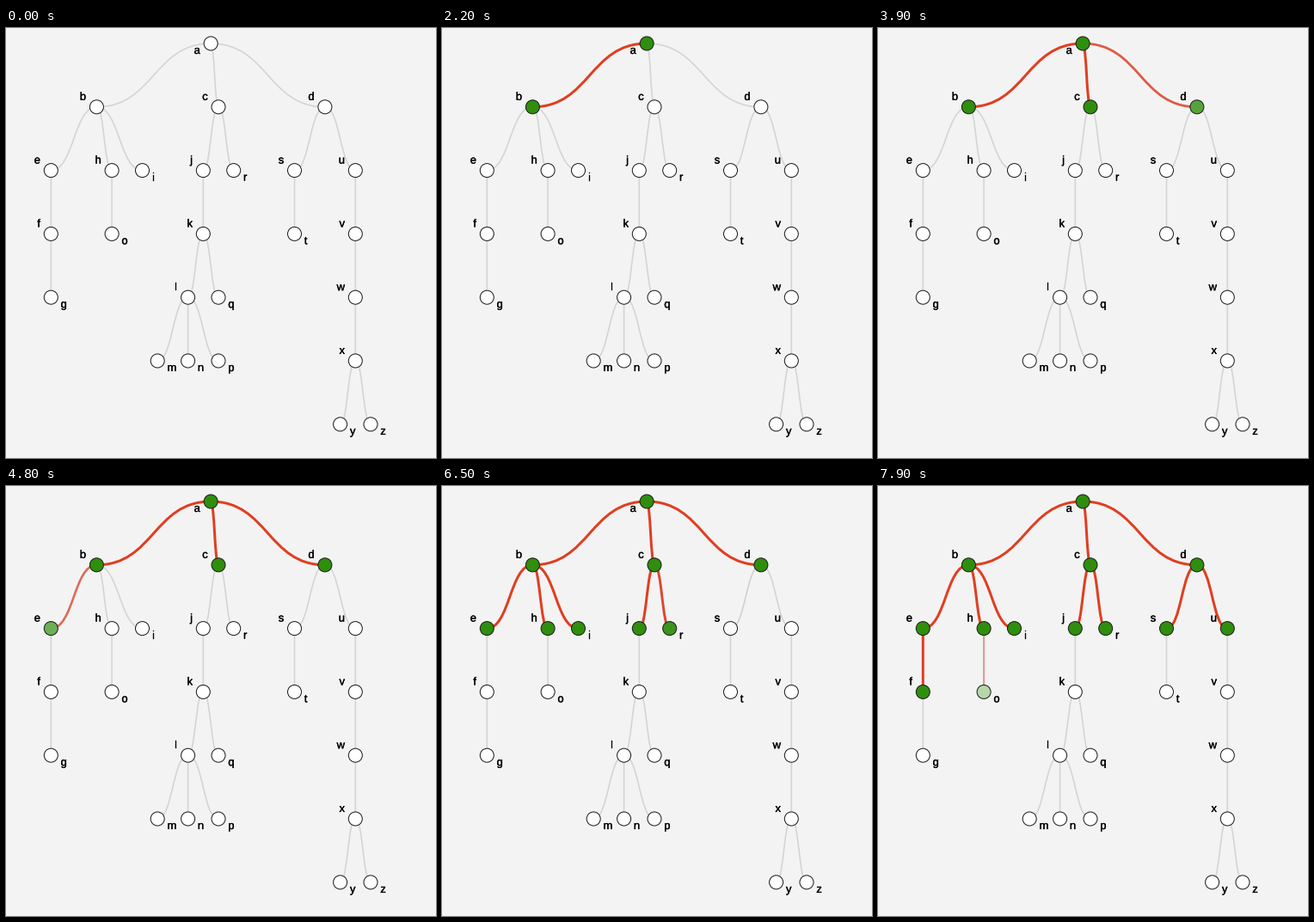
A matplotlib script for the animation above (8 s loop, 500x500 px).

```python
import matplotlib.pyplot as plt
import numpy as np
from matplotlib.animation import FuncAnimation
from matplotlib.colors import to_rgb
from matplotlib.patches import Circle, PathPatch
from matplotlib.path import Path
from matplotlib.patheffects import withStroke

SIZE, DPI = 500, 100
FRAME_MS, FRAMES = 100, 80
FADE_MS = 750
PX = 72 / DPI

BACKGROUND = "#f3f3f3"
NODE_IDLE, NODE_SEEN = "#ffffff", "#2f8e0e"
EDGE_IDLE, EDGE_SEEN = "#d4d4d4", "#e03e20"
EDGE_WIDTH = 1.6, 3.0
RADIUS = 8

# name: (parent, column, depth)
TREE = {
    "a": (None, 10.5, 0),
    "b": ("a", 3, 1), "c": ("a", 11, 1), "d": ("a", 18, 1),
    "e": ("b", 0, 2), "h": ("b", 4, 2), "i": ("b", 6, 2),
    "j": ("c", 10, 2), "r": ("c", 12, 2),
    "s": ("d", 16, 2), "u": ("d", 20, 2),
    "f": ("e", 0, 3), "o": ("h", 4, 3), "k": ("j", 10, 3),
    "t": ("s", 16, 3), "v": ("u", 20, 3),
    "g": ("f", 0, 4), "l": ("k", 9, 4), "q": ("k", 11, 4), "w": ("v", 20, 4),
    "m": ("l", 7, 5), "n": ("l", 9, 5), "p": ("l", 11, 5), "x": ("w", 20, 5),
    "y": ("x", 19, 6), "z": ("x", 21, 6),
}

# Moment at which the breadth-first search reaches each node, in ms
VISITS = {
    "a": 400, "b": 1430, "c": 2665, "d": 3420, "e": 4365, "h": 4870,
    "i": 5365, "j": 5450, "r": 5930, "s": 6350, "u": 6765, "f": 7160, "o": 7565,
}


def position(name):
    _, column, depth = TREE[name]
    return 52.3 + 17.7 * column, 18 + 73.8 * depth


def ease(t):
    t = min(max(t, 0), 1)
    return 4 * t**3 if t < 0.5 else 1 - 4 * (1 - t) ** 3


def mix(start, end, amount):
    start, end = np.array(to_rgb(start)), np.array(to_rgb(end))
    return tuple(start + (end - start) * amount)


def add_edge(parent, child):
    (x0, y0), (x1, y1) = position(parent), position(child)
    middle = (x0 + x1) / 2
    path = Path([(x0, y0), (middle, y0), (middle, y1), (x1, y1)],
                [Path.MOVETO] + [Path.CURVE4] * 3)
    return ax.add_patch(PathPatch(path, fill=False, capstyle="butt",
                                  snap=False, zorder=1))


def add_label(name):
    x, y = position(name)
    leaf = name not in parents
    below = leaf or name == "a"
    ax.text(x + (11.3 if leaf else -12.3), y + (12 if below else -8), name,
            ha="left" if leaf else "right", va="baseline", color="black",
            family="Liberation Sans", fontsize=13 * PX, zorder=4,
            path_effects=[withStroke(linewidth=0.3 * PX, foreground="black")])


plt.rcParams["text.hinting"] = "none"
fig = plt.figure(figsize=(SIZE / DPI, SIZE / DPI), dpi=DPI, facecolor=BACKGROUND)
ax = fig.add_axes([0, 0, 1, 1])
ax.set(xlim=(0, SIZE), ylim=(SIZE, 0))
ax.axis("off")

parents = {parent for parent, _, _ in TREE.values()}
edges, nodes = {}, {}
for name, (parent, _, _) in TREE.items():
    if parent:
        edges[name] = add_edge(parent, name)
    nodes[name] = ax.add_patch(
        Circle(position(name), RADIUS, edgecolor="#1a1a1a", linewidth=PX, zorder=3))
    add_label(name)


def draw(frame):
    now = frame * FRAME_MS
    for name, node in nodes.items():
        amount = ease((now - VISITS.get(name, np.inf)) / FADE_MS)
        node.set_facecolor(mix(NODE_IDLE, NODE_SEEN, amount))
        if name in edges:
            thin, thick = EDGE_WIDTH
            edges[name].set_edgecolor(mix(EDGE_IDLE, EDGE_SEEN, amount))
            edges[name].set_linewidth((thin + (thick - thin) * amount) * PX)
            edges[name].set_zorder(1 + amount)
    return [*edges.values(), *nodes.values()]


animation = FuncAnimation(fig, draw, frames=FRAMES, interval=FRAME_MS,
                          repeat=True, repeat_delay=0)
plt.show()
```
